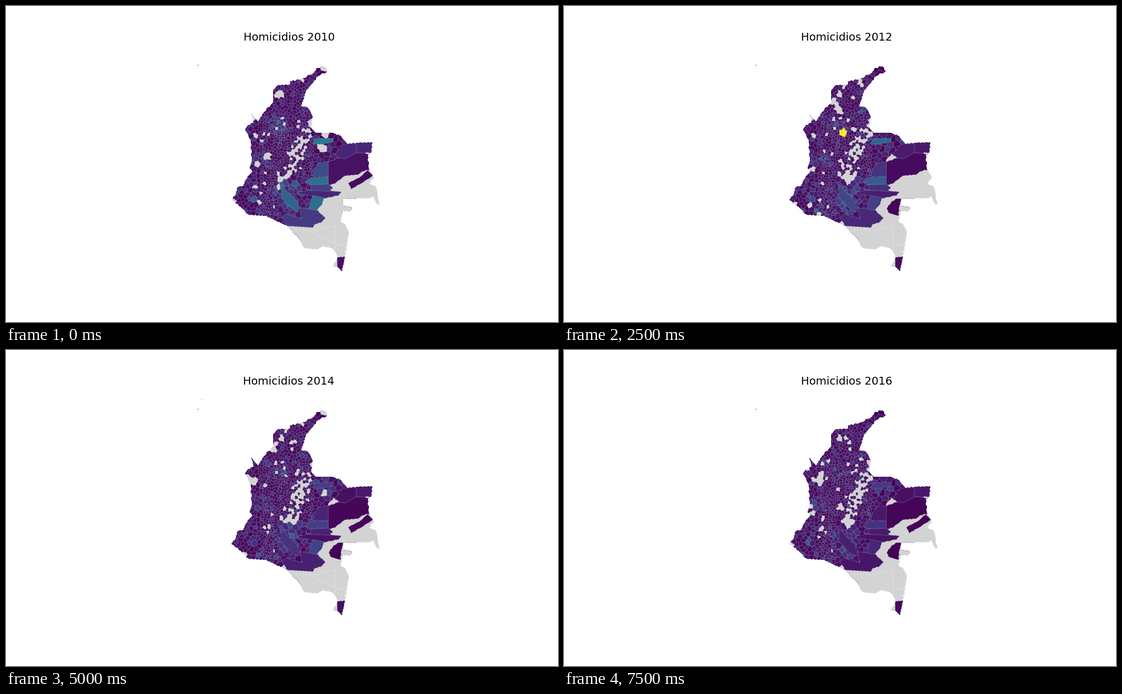
Animation, 990 px wide and 566 px high, one loop 8000 ms. Source, as a matplotlib script:

```python
import numpy as np
import matplotlib.pyplot as plt
from matplotlib.animation import FuncAnimation
from matplotlib.collections import PolyCollection
from matplotlib.patches import Polygon, Rectangle
from matplotlib.path import Path

W, H, DPI = 990, 566, 64
PX = 72 / DPI            # points per pixel
YEARS = range(2010, 2017)
GREY = (211 / 255,) * 3 + (1,)
CLEAR = (0, 0, 0, 0)
FADE = 0.86              # yearly decline of the high levels
viridis = plt.get_cmap("viridis")
rng = np.random.default_rng(7)


def rough(pts, amp=0.9):
    """Wobble slanted edges; both neighbours of an edge get the same wobble."""
    out = []
    pts = np.asarray(pts, float)
    for a, b in zip(pts, np.roll(pts, -1, axis=0)):
        d = b - a
        n = int(np.hypot(*d) / 2) + 1
        if min(abs(d)) < 1:
            n = 1
        for t in np.arange(n) / n:
            x, y = a + t * d
            k = amp * np.sin(np.pi * t)
            out.append((x + k * np.sin(1.9 * x + 2.7 * y),
                        y + k * np.cos(2.3 * x - 1.7 * y)))
    return np.array(out)


def colour(value):
    return GREY if value < 0 else viridis(float(value))


def bump(x, y, r):
    return np.exp(-((sx - x) ** 2 + (sy - y) ** 2) / r ** 2)


# Border, clockwise from the northern tip
east = [
    (552, 120), (557, 112), (567, 108), (574, 110), (577, 117), (560, 125),
    (552, 135), (538, 152), (529, 180), (540, 181), (550, 198), (547, 218),
    (555, 227), (585, 227), (601, 233), (612, 247), (632, 245), (657, 244),
    (655, 264), (649, 266), (651, 292), (660, 308), (651, 318), (663, 323),
    (670, 354), (666, 356), (659, 341), (655, 344), (605, 345), (605, 358)]
south = [
    (620, 361), (619, 368), (604, 367), (600, 387), (607, 390), (615, 406),
    (606, 460), (602, 476), (594, 467), (586, 467), (595, 450), (585, 434),
    (568, 430), (560, 436), (536, 434), (527, 418), (505, 394), (483, 384),
    (467, 376), (436, 374), (424, 363), (404, 347), (411, 340), (415, 325)]
west = [
    (426, 322), (430, 311), (442, 296), (437, 291), (441, 278), (439, 240),
    (429, 222), (433, 214), (444, 209), (439, 192), (452, 207), (463, 190),
    (479, 173), (479, 152), (487, 142), (509, 141), (510, 135), (530, 131)]
border = east + south + west

# Large districts, painted over the small ones
regions, levels = [], []


def region(level, pts, years=YEARS):
    jitter = rng.uniform(0.75, 1.2, len(YEARS))
    regions.append(rough(pts, 0.7))
    levels.append([colour(level * FADE ** k * jitter[k]) if y in years else CLEAR
                   for k, y in enumerate(YEARS)])


wilds = [
    (578, 322), (599, 311), (608, 304), (632, 301), (640, 296), (652, 293),
    (680, 290), (680, 480), (580, 480), (500, 440), (505, 394), (553, 392),
    (573, 380), (558, 365), (570, 345), (597, 339), (601, 333), (583, 331)]
later = YEARS[1:]

region(-1, wilds)
region(0.04, [(578, 279), (597, 272), (608, 274), (628, 263), (652, 265),
              (653, 293), (640, 296), (632, 302), (608, 304), (590, 318),
              (578, 321)])
region(0.03, [(614, 317), (634, 307), (649, 294), (658, 304), (635, 319),
              (619, 328)], [y for y in YEARS if y not in (2011, 2012)])
region(0.13, [(628, 245), (662, 240), (660, 264), (640, 262), (628, 263)])
region(0.10, [(590, 266), (604, 248), (628, 246), (628, 263), (608, 274),
              (597, 272)])
region(-1, [(578, 275), (588, 265), (597, 272), (578, 279)], later)
region(0.42, [(550, 247), (555, 237), (587, 237), (587, 243), (566, 248)])
region(0.20, [(550, 305), (555, 288), (562, 281), (578, 278), (578, 306)])
region(0.33, [(536, 314), (548, 307), (578, 306), (578, 319), (546, 320)])
region(0.22, [(546, 321), (578, 319), (586, 325), (580, 333), (548, 330)])
region(0.10, [(521, 335), (540, 330), (601, 333), (597, 339), (570, 344)])
region(0.31, [(550, 339), (570, 344), (567, 355), (557, 366), (543, 363)])
region(0.28, [(494, 320), (510, 338), (522, 349), (527, 361), (522, 369),
              (508, 360), (493, 342)])
region(0.15, [(527, 361), (557, 366), (573, 380), (565, 388), (553, 391),
              (551, 397), (505, 394), (495, 380), (500, 372), (531, 381)])
region(0.01, [(579, 362), (588, 350), (597, 345), (605, 345), (601, 361),
              (600, 376), (583, 371)], later)
region(0.22, [(596, 388), (601, 385), (614, 402), (612, 408), (597, 403)],
       [2015])
region(0.06, [(594, 450), (608, 449), (606, 460), (603, 477), (594, 467)])
region(2, [(494, 222), (499, 222), (502, 217), (508, 225), (504, 235),
           (494, 231)], [2012])


# Small districts: cells around scattered sites, finer in the mountains
def spacing(x, y):
    s = 3.8 + 2.6 * (x < 457) + 0.9 * (y < 205) + 9 * (x > 550) * (y < 200)
    s += np.clip((x - 550) / 2, 0, 6) * (y > 215)
    return s + 4 * (y > 300 and x > 484)


def scatter():
    pts = rng.uniform((402, 105), (615, 400), (30000, 2))
    keep = Path(border).contains_points(pts) & ~Path(wilds).contains_points(pts)
    sites = np.full((3000, 2), -999.0)
    n = 0
    for p in pts[keep]:
        gap = spacing(*p) * rng.uniform(0.8, 1.5)
        if ((sites[:n] - p) ** 2).sum(1).min(initial=1e9) > gap ** 2:
            sites[n] = p
            n += 1
    return sites[:n]


def cut(poly, mid, normal):
    """Keep the part of poly behind the line through mid."""
    side = [(x - mid[0]) * normal[0] + (y - mid[1]) * normal[1] for x, y in poly]
    out = []
    for i, (p, d) in enumerate(zip(poly, side)):
        q, e = poly[i - 1], side[i - 1]
        if d * e < 0:
            t = e / (e - d)
            out.append((q[0] + t * (p[0] - q[0]), q[1] + t * (p[1] - q[1])))
        if d <= 0:
            out.append(p)
    return out


def cell(site, sites):
    x, y = site
    r = 30
    poly = [(x - r, y - r), (x + r, y - r), (x + r, y + r), (x - r, y + r)]
    near = np.argsort(((sites - site) ** 2).sum(1))[1:36]
    for q in sites[near]:
        poly = cut(poly, (site + q) / 2, q - site)
    return rough(poly, 0.9)


sites = scatter()
cells = [cell(s, sites) for s in sites]
sx, sy = sites.T

# Busy areas, and the mountain belt where few districts report
heat = (bump(488, 215, 14) + bump(465, 276, 10) + bump(533, 188, 6)
        + bump(457, 369, 8) + bump(442, 342, 7) + 0.8 * bump(505, 335, 28))
a, b = np.array((546, 213)), np.array((506, 300))
along = np.clip((sites - a) @ (b - a) / ((b - a) @ (b - a)), 0, 1)
belt = np.hypot(*(sites - a - along[:, None] * (b - a)).T)
quiet = 0.12 + 0.48 * np.exp(-(belt / 12) ** 2)
habit, shy = rng.random((2, len(sites)))


def year_colours(k):
    luck, lapse = rng.random((2, len(sites)))
    value = 0.01 + 0.2 * (0.6 * habit + 0.4 * luck) ** 2.5
    value += heat * (0.08 + 0.22 * luck ** 3) * FADE ** (k / 2)
    gaps = bump(495, 156, 6) + bump(449, 233, 8)
    for x, y in rng.choice(sites[sx < 515], 7):
        gaps += bump(x, y, rng.uniform(3, 7))
    value[(0.7 * shy + 0.3 * lapse < quiet) | (gaps > 0.45)] = -1
    return [colour(v) for v in value]


cell_colours = [year_colours(k) for k in range(len(YEARS))]
region_colours = list(zip(*levels))

# Stage
fig = plt.figure(figsize=(W / DPI, H / DPI), dpi=DPI, facecolor="white")
ax = fig.add_axes((0, 0, 1, 1))
ax.set(xlim=(0, W), ylim=(H, 0))
ax.axis("off")

country = Polygon(rough(border, 1.1), fc="none", ec="none")
ax.add_patch(country)


def layer(polys, z, **style):
    art = PolyCollection(polys, zorder=z, **style)
    ax.add_collection(art, autolim=False)
    art.set_clip_path(country)
    return art


# The unsmoothed copy below keeps white from showing between the cells
line = dict(edgecolors="0.8", linewidths=0.2 * PX)
under = layer(cells, 1, edgecolors="none", antialiaseds=False)
over = layer(cells, 2, **line)
large = layer(regions, 3, **line)

for pts in [[(590, 392), (590, 437)], [(591, 427), (611, 427)],
            [(515, 402), (560, 402), (590, 394)],
            [(540, 399), (556, 410), (590, 425)]]:
    ax.plot(*zip(*pts), color="#e4e4e4", lw=0.7 * PX, zorder=4)

ax.add_patch(Rectangle((343.7, 105), 0.8, 2, fc="#55405f", ec="none"))
islet = ax.add_patch(Rectangle((351.2, 88), 1, 1, ec="none"))
title = ax.text(507.4, 62, "", fontsize=19.64 * PX, family="DejaVu Sans",
                ha="center", va="baseline")


def draw(i):
    k = min(i // 5, 6)
    under.set_facecolor(cell_colours[k])
    over.set_facecolor(cell_colours[k])
    large.set_facecolor(region_colours[k])
    islet.set_facecolor("#6d6478" if YEARS[k] == 2014 else "#f0f0f0")
    title.set_text(f"Homicidios {YEARS[k]}")
    return under, over, large, islet, title


anim = FuncAnimation(fig, draw, frames=32, interval=250, repeat=True,
                     repeat_delay=0, blit=False)
plt.show()
```
